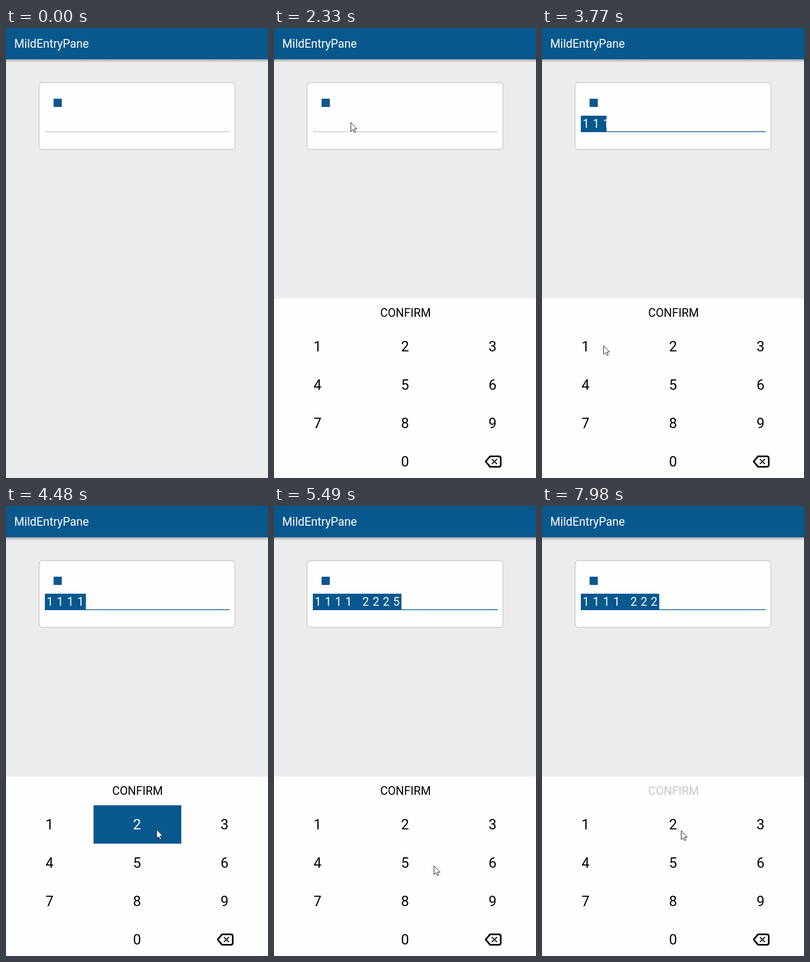
Animation of 479x821 px, one loop 8 s. Source, as an HTML page:

```html
<!DOCTYPE html>
<html lang="en">
<head>
<meta charset="utf-8">
<title>Card entry</title>
<style>
  html, body { margin: 0; width: 100%; height: 100%; overflow: hidden; background: #ececec; }
  svg { display: block; width: 100%; height: 100%; }
  text { font: 21.2px Roboto, sans-serif; }
  .mid { text-anchor: middle; }
  .key text { font-size: 26px; }
  .key rect { fill: none; }
  .key.on rect { fill: #08588e; }
  .key.on text { fill: #fff; }
</style>
</head>
<body>
<svg viewBox="0 0 479 821">
  <defs>
    <linearGradient id="shade" x2="0" y2="1">
      <stop stop-color="#000" stop-opacity=".3"/>
      <stop offset="1" stop-color="#000" stop-opacity="0"/>
    </linearGradient>
    <clipPath id="clip"><rect id="mask" x="71" y="160" height="30"/></clipPath>
  </defs>

  <rect width="479" height="821" fill="#ececec"/>
  <rect y="57" width="479" height="6" fill="url(#shade)"/>
  <rect width="479" height="57" fill="#08588e"/>
  <text x="15" y="36" fill="#fff">MildEntryPane</text>

  <rect x="60.5" y="99.5" width="358" height="122" rx="6" fill="#fefefe" stroke="#c6c6c6" stroke-width="1.3"/>
  <rect x="87" y="129" width="15" height="15" fill="#08588e"/>
  <rect id="line" x="71" y="188.5" width="338" height="1.4"/>
  <g id="entry" clip-path="url(#clip)" fill="#fff">
    <rect x="71" y="160" width="338" height="30" fill="#08588e"/>
  </g>

  <g id="pad">
    <rect y="493.5" width="479" height="328" fill="#fefefe"/>
    <text id="confirm" class="mid" x="240.5" y="527">CONFIRM</text>
    <g id="keys"></g>
    <g fill="none" stroke="#000" stroke-linejoin="round">
      <path stroke-width="3" d="M395 781.5H411q3.5 0 3.5 3.5V797q0 3.5-3.5 3.5H395L387 791Z"/>
      <path stroke-width="1.8" d="M398.3 786.3l9.4 9.4m0-9.4l-9.4 9.4"/>
    </g>
  </g>

  <path id="mouse" d="M.5 .5V16.6L4.2 13.1 6.7 18.5 9.1 17.5 6.7 12.1H11.6Z"
        fill="#fff" stroke="#1c1c30" stroke-width="1"/>
</svg>
<script>
const LOOP = 8000;
const CELL = 18.7, GAP = 12.5;
const $ = id => document.getElementById(id);

function add(parent, tag, attrs, content = '') {
  const el = document.createElementNS('http://www.w3.org/2000/svg', tag);
  for (const name in attrs) el.setAttribute(name, attrs[name]);
  el.textContent = content;
  return parent.appendChild(el);
}

// Entry text: evenly spaced digits in groups of four
[...'111122255'].forEach((digit, i) => {
  const x = 71 + (i + .5) * CELL + Math.floor(i / 4) * GAP;
  add($('entry'), 'text', { class: 'mid', x, y: 182 }, digit);
});

const keys = {};
['1', '2', '3', '4', '5', '6', '7', '8', '9', '', '0', 'del'].forEach((name, i) => {
  const x = i % 3 * 160, y = 546 + Math.floor(i / 3) * 70;
  const key = keys[name] = add($('keys'), 'g', { class: 'key' });
  add(key, 'rect', { x, y, width: 160.5, height: 70 });
  if (name && name !== 'del') add(key, 'text', { class: 'mid', x: x + 79.5, y: y + 43.5 }, name);
});

// Pointer moves: start, end, steps, x, y
const moves = [
  [1180, 1740, 8, 140, 172],
  [2480, 2970, 7, 112, 579],
  [4000, 4240, 4, 275, 601],
  [4330, 4410, 2, 275, 590],
  [4990, 5070, 2, 292, 656],
  [5930, 6390, 6, 404, 805],
  [7390, 7900, 7, 254, 606],
  [7980, 7980, 1, 254, 592]
];

const presses = [
  ['1', 3500, 3580], ['1', 3660, 3740], ['1', 3830, 3910],
  ['2', 4480, 4560], ['2', 4640, 4720], ['2', 4800, 4880],
  ['5', 5070, 5240], ['5', 5670, 5850],
  ['del', 6760, 6870], ['del', 7130, 7215]
];

// Revealed width of the entry: time, width
const widths = [
  [3580, 18.7], [3660, 37.4], [3770, 47], [3830, 56.1], [3910, 65], [3990, 75],
  [4560, 106], [4720, 124.7], [4880, 143.4], [5240, 152], [5320, 162.1],
  [5850, 178], [5930, 194], [6870, 178], [6960, 162.1], [7215, 152], [7300, 143.4]
];

function pointer(t) {
  let x = 453, y = 212;
  for (const [from, to, steps, tx, ty] of moves) {
    if (t < from) break;
    const step = Math.floor((t - from) / (to - from || 1) * (steps - 1));
    const p = Math.min(1, (step + 1) / steps);
    const ease = p * p * (3 - 2 * p);
    x += (tx - x) * ease;
    y += (ty - y) * ease;
  }
  return [Math.round(x), Math.round(y)];
}

function draw(t) {
  const [x, y] = pointer(t);
  $('mouse').setAttribute('transform', `translate(${x} ${y})`);
  $('mouse').style.display = t < 1180 ? 'none' : '';

  $('pad').style.display = t < 2240 ? 'none' : '';
  $('pad').setAttribute('transform', `translate(0 ${t < 2330 ? 130 : 0})`);

  let width = 0;
  for (const [at, w] of widths) if (t >= at) width = w;
  $('mask').setAttribute('width', width);
  $('line').setAttribute('fill', t < 3500 ? '#c6c6c6' : '#08588e');
  $('confirm').setAttribute('fill', t < 6780 ? '#000' : '#c8c8c8');

  for (const name in keys) {
    const on = presses.some(([key, from, to]) => key === name && t >= from && t < to);
    keys[name].classList.toggle('on', on);
  }
}

const start = performance.now();
function tick() {
  draw((performance.now() - start) % LOOP);
  requestAnimationFrame(tick);
}
tick();
</script>
</body>
</html>
```
